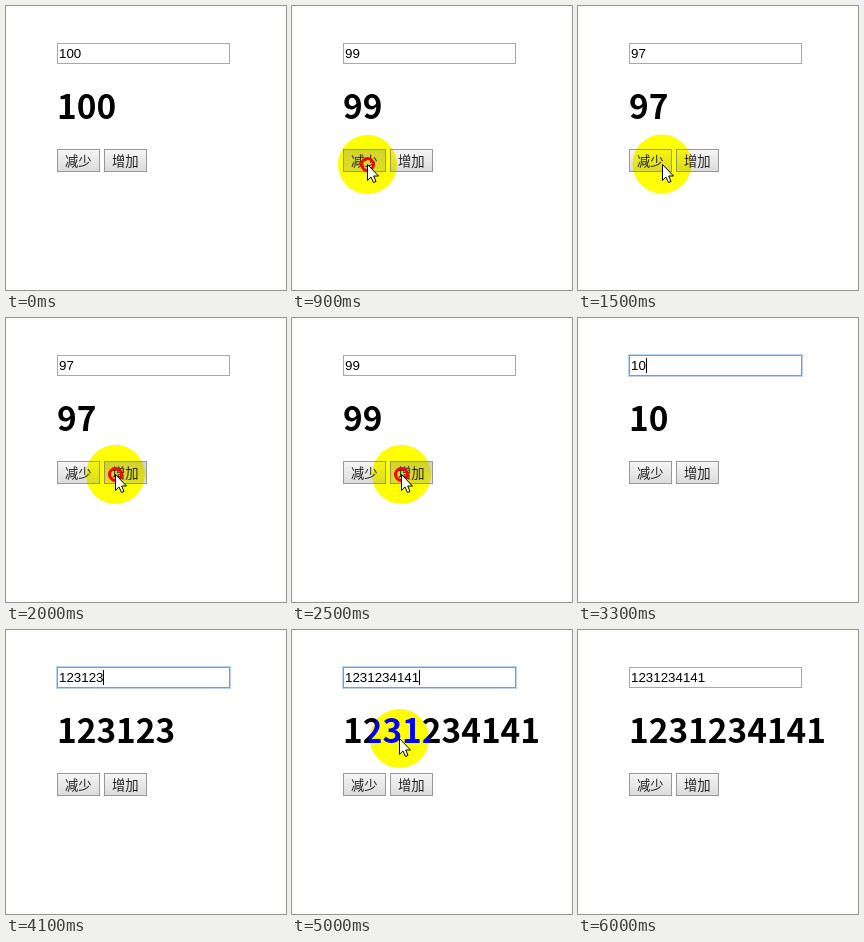
An HTML page with a canvas that plays this animation: 280 px wide and 284 px high, repeating every 6100 ms.

```html
<!DOCTYPE html>
<html lang="zh">
<head>
<meta charset="utf-8">
<title>Counter</title>
<style>
html, body { margin: 0; width: 100%; height: 100%; overflow: hidden; background: #fff; }
canvas { display: block; width: 280px; height: 284px; }
</style>
</head>
<body>
<canvas id="stage" width="280" height="284"></canvas>
<script>
const ctx = document.getElementById('stage').getContext('2d');
const LOOP = 6100, STEP = 100;
const CJK = '"Noto Sans CJK SC", "Noto Sans CJK", sans-serif';

const MINUS_START = 600, PLUS_START = 1900, CLICK_PERIOD = 300, CLICK_HOLD = 200;
const FOCUS = 3100, ERASE = 3300, TYPE = 3400, RESUME = 4400, BLUR = 6000;

const minus = { x: 75, y: 158 }, plus = { x: 109, y: 156 };
const title = { x: 109, y: 124 }, field = { x: 93, y: 45 };
const digits = { x: 107, y: 108 };

const legs = [
  { start: 100, end: 300, from: { x: 84, y: 141 }, to: minus },
  { start: 1400, end: 1800, from: minus, to: plus },
  { start: 2700, end: 2800, from: plus, to: title },
  { start: 2800, end: 3000, from: title, to: field },
  { start: 4900, end: 5000, from: { x: 93, y: 75 }, to: digits },
  { start: 5000, end: 5100, from: digits, to: { x: 268, y: 223 } }
];

const clamp = (v, lo, hi) => Math.min(hi, Math.max(lo, v));
const within = (t, a, b) => t >= a && t < b;

// Three clicks in a row: is the button down, and how many are finished
const isDown = (t, start) =>
  within(t, start, start + 3 * CLICK_PERIOD) && (t - start) % CLICK_PERIOD < CLICK_HOLD;
const clicksDone = (t, start) =>
  clamp(Math.floor((t - start + CLICK_PERIOD - CLICK_HOLD) / CLICK_PERIOD), 0, 3);

function valueAt(t) {
  if (t < ERASE) return String(100 - clicksDone(t, MINUS_START) + clicksDone(t, PLUS_START));
  if (t < TYPE) return '10';
  const typed = clamp((t - TYPE) / STEP, 0, 6) + clamp((t - RESUME) / STEP, 0, 4);
  return '1231234141'.slice(0, typed);
}

// The pointer hides while keys are typed and after it leaves
function pointerAt(t) {
  if (!within(t, 100, ERASE) && !within(t, 4900, 5200)) return null;
  const { start, end, from, to } = legs.filter(leg => leg.start <= t).pop();
  const k = clamp((t - start) / (end - start), 0, 1);
  return [from.x + (to.x - from.x) * k, from.y + (to.y - from.y) * k];
}

function text(str, x, y, font, color = '#000') {
  ctx.font = font;
  ctx.fillStyle = color;
  ctx.fillText(str, x, y);
}

function frame(x, y, w, h, color) {
  ctx.strokeStyle = color;
  ctx.lineWidth = 1;
  ctx.strokeRect(x + .5, y + .5, w - 1, h - 1);
}

function drawInput(value, focused, caret) {
  if (focused) frame(50, 36, 175, 23, '#bcd2f4');
  frame(51, 37, 173, 21, focused ? '#709ce0' : '#a9a9a9');
  text(value, 53, 52, '13.333px "Liberation Sans", Arial, sans-serif');
  if (caret) ctx.fillRect(Math.round(53 + ctx.measureText(value).width), 40, 1, 15);
}

function drawButton(x, down) {
  const fill = ctx.createLinearGradient(0, 143, 0, 166);
  fill.addColorStop(0, down ? '#d2d2d2' : '#f6f6f6');
  fill.addColorStop(1, down ? '#dedede' : '#dadada');
  ctx.fillStyle = fill;
  ctx.fillRect(x, 143, 43, 23);
  frame(x, 143, 43, 23, '#999');
}

function drawLabel(str, x) {
  text(str, x + 8, 160, '13.333px ' + CJK, '#222');
}

function drawHalo(x, y) {
  // Blue difference: white becomes yellow, black becomes blue
  ctx.globalCompositeOperation = 'difference';
  ctx.fillStyle = '#00f';
  ctx.beginPath();
  ctx.arc(x + .5, y + .5, 29.5, 0, Math.PI * 2);
  ctx.fill();
  ctx.globalCompositeOperation = 'source-over';
}

function drawRing(x, y) {
  ctx.strokeStyle = '#f00';
  ctx.lineWidth = 3;
  ctx.beginPath();
  ctx.arc(x + .5, y + .5, 6, 0, Math.PI * 2);
  ctx.stroke();
}

function drawArrow(x, y) {
  ctx.save();
  ctx.translate(Math.round(x) + .5, Math.round(y) + .5);
  ctx.fillStyle = '#fff';
  ctx.strokeStyle = '#000';
  ctx.lineWidth = 1;
  const shape = new Path2D('M0 0V16L3.5 12.5L6 18L8.5 17L6.2 11.5H11Z');
  ctx.fill(shape);
  ctx.stroke(shape);
  ctx.restore();
}

function drawBeam(x, y) {
  const cx = Math.round(x) + 2, top = Math.round(y) - 7;
  ctx.fillStyle = '#222';
  ctx.fillRect(cx, top, 1, 16);
  for (const dy of [0, 15]) {
    ctx.fillRect(cx - 3, top + dy, 3, 1);
    ctx.fillRect(cx + 1, top + dy, 3, 1);
  }
}

function draw(t) {
  ctx.fillStyle = '#fff';
  ctx.fillRect(0, 0, 280, 284);
  const value = valueAt(t), at = pointerAt(t);
  const minusDown = isDown(t, MINUS_START), plusDown = isDown(t, PLUS_START);
  const focused = within(t, FOCUS, BLUR);

  drawInput(value, focused, focused && !within(t, 5400, 5900));
  text(value, 51, 113, 'bold 33.4px ' + CJK);
  drawButton(51, minusDown);
  drawButton(98, plusDown);
  if (at) drawHalo(...at);
  drawLabel('减少', 51);
  drawLabel('增加', 98);
  if (!at) return;

  if (minusDown || plusDown || within(t, FOCUS, FOCUS + STEP)) drawRing(...at);
  if (within(t, 2800, ERASE)) drawBeam(...at);
  else drawArrow(...at);
}

function tick() {
  const t = performance.now() % LOOP;
  draw(Math.floor(t / STEP) * STEP);
  requestAnimationFrame(tick);
}
tick();
</script>
</body>
</html>
```
